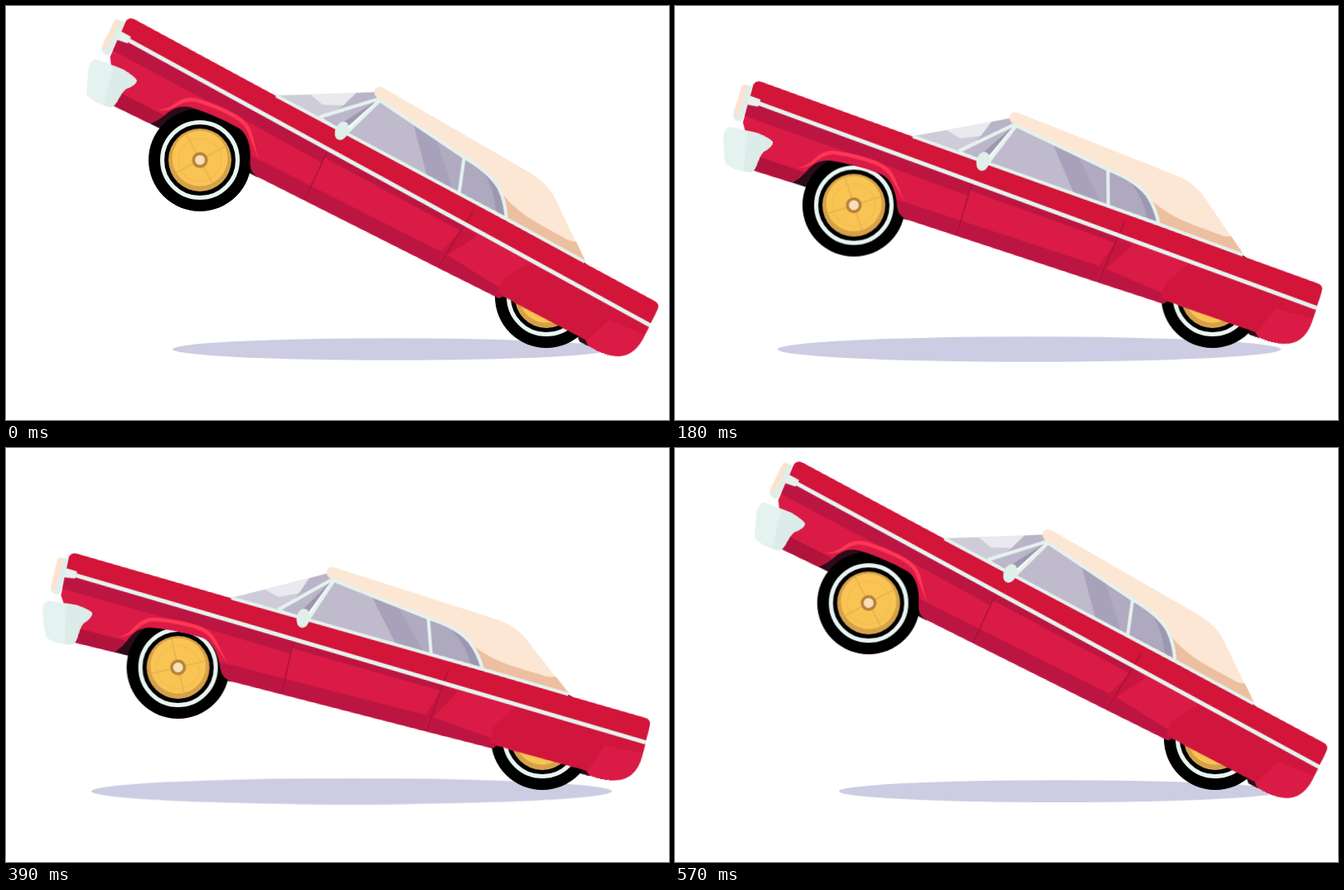
An HTML page for the animation above (0.6 s loop, 800x500 px).

```html
<!DOCTYPE html>
<html lang="en">
<head>
<meta charset="utf-8">
<title>Bouncing convertible</title>
<style>
  html, body { margin: 0; width: 100%; height: 100%; overflow: hidden; background: #fff; }
  svg { display: block; width: 100vw; height: 100vh; }

  /* Down in 300 ms with a slow start, then the same way back. */
  .body, .front, .rear, .spokes { animation: 300ms cubic-bezier(.65, 0, .833, .833) infinite alternate; }
  .shadow { animation: spread 300ms cubic-bezier(.333, 0, .833, .833) infinite alternate; transform-origin: 731px 414.5px; }
  .body   { animation-name: tilt; transform-origin: 636px 394px; }
  .front  { animation-name: drop; }
  .rear   { animation-name: slide; }
  .spokes { animation-name: turn; }

  @keyframes tilt {
    from { transform: rotate(22.6deg); }
    to   { transform: rotate(-3.8deg); }
  }
  @keyframes drop {
    from { transform: translate(234px, 186px); }
    to   { transform: translate(177.5px, 355px); }
  }
  @keyframes slide {
    from { transform: translate(652px, 351px); }
    to   { transform: translate(641.5px, 351px); }
  }
  @keyframes turn {
    from { transform: rotate(-28deg); }
    to   { transform: rotate(4deg); }
  }
  @keyframes spread {
    from { transform: scale(1); }
    to   { transform: scale(1.302); }
  }
</style>
</head>
<body>
<svg viewBox="0 0 800 500" preserveAspectRatio="none">
  <defs>
    <path id="shell" d="M46,230 L757,303 Q764,304 764,310 L762,345 C761,372 748,385 722,385
      Q710,385 703,383 L698,378 L604,370 Q596,368 586,368 L582,372 L258,348.6
      Q247,347 243,338 Q232,306 214,303 Q182,299 150,302 Q136,304 128,317
      Q120,333 112,339 L62,336 L42,292 L37,283 L38,237 Q39,230 46,230Z"/>
    <clipPath id="shellClip"><use href="#shell"/></clipPath>
    <path id="pane" d="M357,207 L478,231 L489,272 L336,259Z"/>
    <clipPath id="paneClip"><use href="#pane"/></clipPath>
    <path id="screen" d="M240,249 L300,222 L350,199 L357,206 L300,254Z"/>
    <clipPath id="screenClip"><use href="#screen"/></clipPath>
    <g id="rim">
      <circle r="62"/>
      <circle r="45.5" fill="none" stroke="#e9f5f1" stroke-width="5"/>
      <circle r="38" fill="#d5a149"/>
      <circle r="33.5" cy="-2" fill="#f9c453"/>
    </g>
    <g id="hub">
      <path d="M0,-35 V35 M-35,0 H35" stroke="#dca84a" stroke-width="1"/>
      <circle r="26" fill="none" stroke="#efb94f" stroke-width="1"/>
      <circle r="9.5" fill="#b58239"/>
      <circle r="6" fill="#f9dfba"/>
    </g>
  </defs>

  <ellipse class="shadow" cx="466" cy="414.5" rx="265" ry="13.3" fill="#cccce2"/>

  <g class="body" fill="#2e0b1a">
    <path d="M112,339 L128,310 L150,298 H216 L245,325 L258,349Z"/>
    <path d="M684,374 L700,376 L705,384 L692,383Z"/>
  </g>

  <g class="front"><use href="#rim"/><g class="spokes"><use href="#hub"/></g></g>
  <g class="rear"><use href="#rim"/><g class="spokes"><use href="#hub"/></g></g>

  <g class="body">
    <!-- glass -->
    <use href="#screen" fill="#cfccda"/>
    <g clip-path="url(#screenClip)">
      <path d="M277,232 L330,190 L332,224 L296,238Z" fill="#eae9f0"/>
      <path d="M328,209 L360,190 L360,215 L300,256 L318,232Z" fill="#b9b4c8"/>
    </g>
    <path d="M354,209 L302,253 L331,257Z" fill="#bbb6ca"/>
    <path d="M354,209 L322,255 L331,257Z" fill="#9c96b0"/>
    <use href="#pane" fill="#bfbacc"/>
    <g clip-path="url(#paneClip)">
      <path d="M402,212 L436,219 L482,274 L446,270Z" fill="#a7a2b9"/>
      <path d="M436,219 L480,226 L492,276 L482,274Z" fill="#b0abc0"/>
    </g>
    <path d="M479,232 Q517,236 532,250 Q545,262 553,278 L489,272Z" fill="#aea9be"/>
    <path d="M503,236 Q524,241 535,252 L553,278 L538,276 Q527,252 503,236Z" fill="#9d98b1"/>

    <!-- soft top -->
    <path d="M356,191 L561,218 Q585,222 600,236 L640,272 L662,291 L554,280
      Q545,262 532,250 Q515,236 478,231 L357,206 Q347,204 347,197 Q348,190 356,191Z" fill="#fce6d4"/>
    <path d="M538,254 Q560,267 596,271 L632,275 Q638,275 642,273 L662,291 L554,280 Q547,265 538,254Z" fill="#ebbf9f"/>

    <!-- painted shell -->
    <use href="#shell" fill="#d91b45"/>
    <g clip-path="url(#shellClip)">
      <path d="M30,228 L770,302 V333 L30,254Z" fill="#d21538"/>
      <path d="M30,256 L322,285 V303 L215,291 L130,284 L30,274Z" fill="#bd1541"/>
      <path d="M322,285 L511,305 V315 L322,296Z" fill="#bd1541"/>
      <path d="M240,328 L500,347 L585,361 L590,376 L240,352Z" fill="#bd1541"/>
      <path d="M60,318 L124,323 L112,341 L58,338Z" fill="#b1133b"/>
      <path d="M511,308 L529,312 L506,346 L500,368 L496,346Z" fill="#c6153f"/>
      <path d="M600,318 L766,332 V345 L715,345 L699,380 L578,365 V348Z" fill="#d0163c"/>
      <path d="M323,283 L320,354 M513,288 L508,315 L500,367" fill="none" stroke="#a31136" stroke-width="1.3"/>
    </g>
    <path d="M113,320 Q124,317 131,305 Q139,291 154,289 Q182,286 205,289 Q221,291 231,303
      L250,329 L229,307 Q219,295 203,293.5 Q181,291 155,293.5 Q143,295 135,306 Q126,319 113,320Z" fill="#ff3755"/>

    <!-- bright trim -->
    <g fill="none" stroke="#e5f2ee" stroke-width="4">
      <path d="M240,249.5 L553,280 L661,291.5"/>
      <path d="M355,206 L298,253 M358,206 L335,260"/>
      <path d="M355,206 L478,231 Q515,236 532,250 Q545,262 553,279 M478,231 L489,273"/>
      <path d="M46,255.5 L763,332" stroke-width="5"/>
    </g>
    <path d="M32,249 L51,251 L50,260 L34,261Z" fill="#e5f2ee"/>
    <ellipse cx="329.5" cy="258" rx="8" ry="11.5" fill="#dff0eb"/>

    <!-- headlight and bumper -->
    <path d="M28,238 L36,238 L34,283 L28,282 Q23,280 23,273 L25,242 Q25,238 28,238Z" fill="#fbe3cf"/>
    <path d="M32,238 Q38,236 38,242 L36,278 Q35,284 28,282 Q25,281 25,278 Q30,278 30,270Z" fill="#dfeeea"/>
    <path d="M23,292 L56,291 Q77,294 78,298 Q78,304 70,311 Q67,315 66,326 Q65,337 61,339
      Q50,341 41,340 L29,337 Q27,335 18,305 Q17,294 23,292Z" fill="#e4f3ef"/>
    <path d="M45,291.5 L56,291 Q77,294 78,298 Q78,304 70,311 Q67,315 66,326 Q65,337 61,339 L52,340Z" fill="#dcece8"/>
  </g>
</svg>
<script>
  // Hold every pose for one 30 ms step.
  const STEP = 30, LOOP = 600;
  const start = performance.now();
  const moves = document.getAnimations();
  moves.forEach(move => move.pause());

  function show() {
    const time = performance.now() - start + 1;
    const pose = Math.floor(time % LOOP / STEP) * STEP;
    moves.forEach(move => { move.currentTime = pose; });
    requestAnimationFrame(show);
  }
  show();
</script>
</body>
</html>
```
